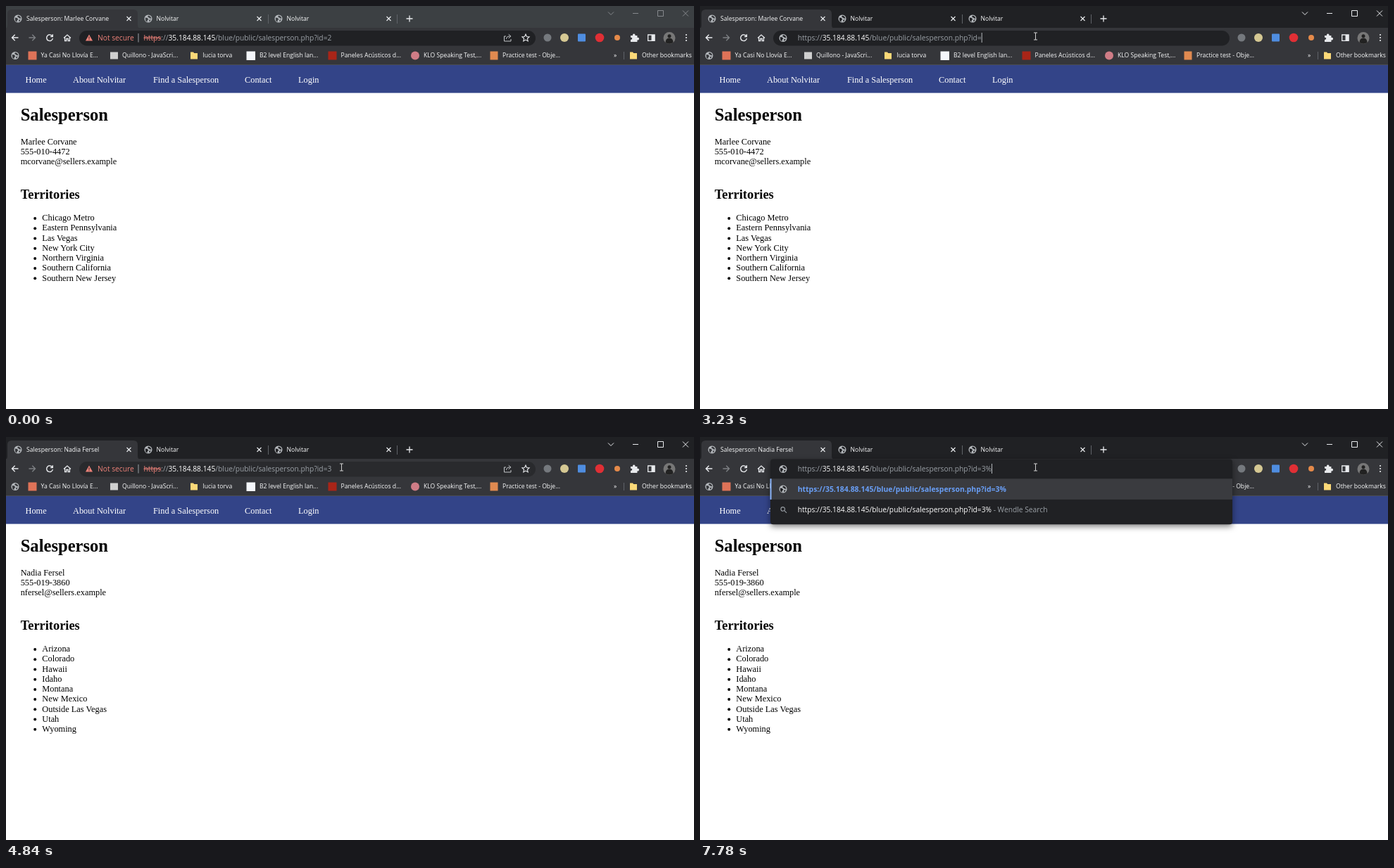
Write an HTML page that moves like this. It is 977x573 px and loops after 8000 ms.

```html
<!DOCTYPE html>
<html lang="en">
<head>
<meta charset="utf-8">
<title>Browser session</title>
<style>
  html, body { margin: 0; width: 100%; height: 100%; overflow: hidden; background: #fff; }
  svg { display: block; width: 977px; height: 573px; }
  .ui { font: 8.65px "Open Sans", sans-serif; fill: #f8f9fa; }
  .url { font: 10.26px "Open Sans", sans-serif; fill: #9aa0a6; }
  .match { font: bold 10.43px "Open Sans", sans-serif; fill: #699ef5; }
  .page { font: 12.35px "Liberation Serif", serif; }
  .h1 { font: bold 24.6px "Liberation Serif", serif; }
  .h2 { font: bold 18.4px "Liberation Serif", serif; }
  .white { fill: #fff; }
  .red { fill: #ee8279; }
  .strike { text-decoration: line-through; }
  .drop { filter: drop-shadow(0 3px 4px rgba(0, 0, 0, .5)); }
</style>
</head>
<body>
<svg id="stage" viewBox="0 0 977 573"></svg>
<script>
const LOOP = 8000;
const DARK = '#202124', BAR = '#35363a', LIGHT = '#e8eaed', GREY = '#9aa0a6', BLUE = '#8ab4f8';
const HOST = '35.184.88.145', PATH = '/blue/public/salesperson.php?id=';
const BRAND = 'Nolvitar';
const people = [
  { id: 2, name: 'Marlee Corvane', phone: '555-010-4472', mail: 'mcorvane@sellers.example',
    areas: ['Chicago Metro', 'Eastern Pennsylvania', 'Las Vegas', 'New York City',
      'Northern Virginia', 'Southern California', 'Southern New Jersey'] },
  { id: 3, name: 'Nadia Fersel', phone: '555-019-3860', mail: 'nfersel@sellers.example',
    areas: ['Arizona', 'Colorado', 'Hawaii', 'Idaho', 'Montana', 'New Mexico',
      'Outside Las Vegas', 'Utah', 'Wyoming'] },
];

const stage = document.getElementById('stage');
const ruler = document.createElement('canvas').getContext('2d');
const widthOf = s => {
  ruler.font = '10.26px "Open Sans", sans-serif';
  return ruler.measureText(s).width;
};
const during = (t, ...spans) => spans.some(([from, to]) => t >= from && t < to);

const text = (x, y, s, cls = 'ui') => `<text x="${x}" y="${y}" class="${cls}">${s}</text>`;
const rect = (x, y, w, h, fill, r = 0, more = '') =>
  `<rect x="${x}" y="${y}" width="${w}" height="${h}" rx="${r}" fill="${fill}" ${more}/>`;
const disc = (x, y, r, fill) => `<circle cx="${x}" cy="${y}" r="${r}" fill="${fill}"/>`;
const line = (d, color = LIGHT, w = 1.2) =>
  `<path d="${d}" fill="none" stroke="${color}" stroke-width="${w}"/>`;
const shape = (d, fill) => `<path d="${d}" fill="${fill}"/>`;
const cross = (x, y, r, color, w) =>
  line(`M${x - r} ${y - r}l${2 * r} ${2 * r}m0 ${-2 * r}l${-2 * r} ${2 * r}`, color, w);

const globe = (x, y, back = BAR) => disc(x, y, 5.5, '#b4b8bc') +
  shape(`M${x - 4.2} ${y - 1.5}l3 .6 1.6 1.8-1.6 1.4-.4 2.4-2.2-1.8z
    M${x} ${y - 4.4}l3 1.2 1.5 2.6-2 .4-1.4-1.4-1.9-.6z M${x + 1.6} ${y + 1.4}l2.2-.2-1.6 2.8-1.2-.6z`, back);
const folder = (x, y) => shape(`M${x - 5} ${y - 5}h4l1.2 1.5h4.8v8.5h-10z`, '#fbd978');

function tabStrip(active, title, loading, t) {
  const controls = active ? LIGHT : '#85888c';
  const strip = active ? DARK : '#3c4043';
  const angle = t * .5 % 360;
  const spinner = `<g transform="rotate(${angle} 17 18)">${line('M17 13a5 5 0 1 1-5 5', BLUE, 1.6)}</g>`;
  return rect(0, 0, 977, 32, strip) +
    shape('M0 32q2-1 2-5V11q0-6 6-6h173q6 0 6 6v16q0 4 3 5z', BAR) +
    (loading ? spinner : globe(17, 18)) + text(29, 21.3, title) +
    [202, 387].map(x => globe(x, 18, strip) + text(x + 11.5, 21.3, BRAND)).join('') +
    [174.5, 359.5, 543.5].map(x => cross(x, 18, 3, LIGHT, 1.2)).join('') +
    line('M372.5 12v13M555.5 12v13', '#5f6368', 1) +
    line('M568.5 18h9M573 13.5v9', LIGHT, 1.3) +
    line('M855 8.5l4 4 4-4M890 10.5h8', controls, 1) +
    line('M925.5 6.5h8v8h-8z', controls, 1) + cross(965, 10.5, 4, controls, 1);
}

function toolbar(loading) {
  const reload = loading ? cross(62, 45, 4, LIGHT, 1.4)
    : line('M65.6 42.6A4.4 4.4 0 1 0 66.4 46M66.3 40.3v3.2h-3.2', LIGHT, 1.4);
  return rect(0, 31, 977, 53, BAR) + rect(0, 83, 977, 1, '#494c50') +
    line('M17.5 45H8.5M12.7 40.8L8.5 45l4.2 4.2', LIGHT, 1.4) +
    line('M32.5 45h9M37.3 40.8l4.2 4.2-4.2 4.2', '#7d8084', 1.4) + reload +
    line('M82 45.5l5-4.5 5 4.5M83.6 44.5v5h2.2v-3h2.4v3h2.2v-5', LIGHT, 1.3) +
    disc(769, 45, 5.5, '#75797e') + disc(793, 45, 6, '#d5c893') +
    rect(812, 39.5, 11, 11, '#4f8de0', 1) + disc(843, 45, 6.3, '#e02f35') + disc(868, 45, 4, '#e58a4a') +
    shape('M887 42h3a1.8 1.8 0 1 1 3.4 0h3v3a1.8 1.8 0 1 1 0 3.2v2.8h-9.4v-3.2a1.6 1.6 0 1 0 0-3z', LIGHT) +
    line('M911.7 41h9.4v8.4h-9.4z', LIGHT, 1.3) + rect(916.5, 41, 4.6, 8.4, LIGHT) +
    disc(942, 45.5, 8.5, '#777') + disc(942, 42.8, 2.5, '#222') +
    shape('M936.5 52q0-6.5 5.5-6.5t5.5 6.5q-5.5 3.5-11 0z', '#222') +
    [41, 45, 49].map(y => disc(966, y, 1.1, LIGHT)).join('');
}

const bookmarks = globe(13, 70.5) +
  rect(31.5, 64.5, 12, 12, '#df7358') + text(49.5, 73.3, 'Ya Casi No Llovía E...') +
  rect(148, 65.5, 11, 10, '#cfcfcf') + text(165, 73.3, 'Quillono - JavaScri...') +
  folder(267, 70.5) + text(279.5, 73.3, 'lucia torva') +
  rect(341.5, 64.5, 12.5, 12.5, '#f4f6fb') + text(360, 73.3, 'B2 level English lan...') +
  rect(457.5, 64.5, 12, 12, '#a92518') + text(475.5, 73.3, 'Paneles Acústicos d...') +
  disc(581, 70.5, 6, '#cf7c86') + text(593, 73.3, 'KLO Speaking Test,...') +
  rect(687.5, 64.5, 11, 12, '#e08a50') + text(705, 73.3, 'Practice test - Obje...') +
  text(863, 73.3, '»') + line('M877.5 65v11', '#5f6368', 1) +
  folder(891, 70.5) + text(903, 73.3, 'Other bookmarks');

const address = (x, id, scheme) => text(x, 49, `${scheme}<tspan class="white">${HOST}</tspan>${PATH}${id}`, 'url');
const caretAt = x => rect(x, 38, 1, 14, '#b4b8bc');

function pageAddress(id, focused, hover, selected, caret) {
  const full = `https://${HOST}${PATH}${id}`, x = 195.5, w = widthOf(full);
  const ring = focused ? `stroke="${BLUE}" stroke-width="2"` : '';
  return rect(104, 35, 648, 21.5, hover ? '#292a2d' : DARK, 10.75, ring) +
    shape('M118 40.5l5 9h-10z', '#ee8279') + rect(117.5, 43.5, 1, 3, DARK) + rect(117.5, 47.3, 1, 1, DARK) +
    text(130, 49, 'Not secure', 'url red') + rect(187.5, 39, 1, 12.5, GREY) +
    (selected
      ? rect(x, 38, w, 15, '#4f6f9f') + text(x, 49, full.replace('https', '<tspan class="strike">https</tspan>'), 'url white')
      : address(x, id, '<tspan class="red strike">https</tspan>://')) +
    (caret ? caretAt(x + w) : '') +
    line('M710 43h-2.5v7h9.5v-3M710.5 47q0-4 5-4M713.7 40.3l3.3 2.7-3.3 2.7', '#c4c7ca', 1) +
    line('M738 40.2l1.5 3.3 3.6.4-2.7 2.4.8 3.6-3.2-1.8-3.2 1.8.8-3.6-2.7-2.4 3.6-.4z', LIGHT, 1.1);
}

function suggestions(id, rows) {
  const url = `https://${HOST}${PATH}`, step = 29.6;
  let out = `<g class="drop">${rect(100, 31.5, 656, 33.5 + rows * step, DARK, 4)}</g>` +
    rect(100, 59.3, 656, step, '#3a3b3f') + rect(99.5, 59.3, 2, step, BLUE);
  for (let i = 0; i < rows; i++) {
    const y = 77.8 + i * step;
    if (i === 1) {
      out += line(`M120 ${y - 2.5}l3 3M120.5 ${y - 5}a2.8 2.8 0 1 1-5.6 0 2.8 2.8 0 1 1 5.6 0`, GREY, 1.1) +
        text(138.7, y, `<tspan class="white">${url}${id}</tspan> - Wendle Search`, 'url');
    } else {
      out += globe(118, y - 3.8, DARK) + text(138.7, y, url + (i ? [2, 1, 3, 10][i - 2] : id), 'match');
    }
  }
  return out;
}

function typedAddress(id, rows, caret) {
  const x = 138.7;
  return (rows ? suggestions(id, rows) : rect(104, 35, 648, 21.5, DARK, 10.75)) +
    globe(118, 45.5, DARK) + address(x, id, 'https://') +
    (caret ? caretAt(x + widthOf(`https://${HOST}${PATH}${id}`)) : '');
}

function page(p) {
  const nav = [[27.5, 'Home'], [95, `About ${BRAND}`], [209, 'Find a Salesperson'], [339, 'Contact'], [415, 'Login']];
  return rect(0, 84, 977, 489, '#fff') + rect(0, 84, 977, 39.6, '#334488') +
    nav.map(([x, s]) => text(x, 109, s, 'page white')).join('') +
    text(20.7, 162.7, 'Salesperson', 'h1') +
    [p.name, p.phone, p.mail].map((s, i) => text(20.7, 196.6 + i * 14.2, s, 'page')).join('') +
    text(20.7, 274.3, 'Territories', 'h2') +
    p.areas.map((s, i) => disc(41.2, 302 + i * 14.22, 2, '#000') + text(51.3, 305.2 + i * 14.22, s, 'page')).join('');
}

function pointer(t) {
  const arrow = (x, y) => `<path d="M${x} ${y}v12l2.8-2.6 1.8 4.2 1.8-.8-1.8-4h3.8z" fill="#fff" stroke="#000" stroke-width=".7"/>`;
  if (t < 590) return during(t, [190, 330]) ? arrow(t < 260 ? 918 : 900, 566) : '';
  const rest = 1 - Math.min(1, (t - 590) / 750);
  const x = t < 2150 ? 469.5 + 150 * rest ** 2 : 476.5;
  const y = t < 2150 ? 42 + 368 * rest ** 2 : 43;
  if (y > 57) return arrow(x, y);
  const click = during(t, [1410, 1630], [2350, 2480], [5300, 5450], [6370, 6500]);
  return line(`M${x - 2.5} ${y - 5}h5M${x} ${y - 5}v10M${x - 2.5} ${y + 5}h5`, '#d0d0d0', 1) +
    (click ? disc(x - 1.5, y - 1, 9.5, 'rgba(240,215,0,.65)') : '');
}

function scene(t) {
  const person = people[t < 4400 ? 0 : 1];
  const loading = during(t, [3900, 4840]);
  const typing = during(t, [3230, 4400], [7710, LOOP]);
  const typed = t < 3510 ? '' : t < 7710 ? '3' : '3%';
  const rows = during(t, [3300, 3510]) ? 6 : during(t, [3510, 3900], [7780, LOOP]) ? 2 : 0;
  const focused = during(t, [1630, 3230], [5300, 7710]);
  const selected = during(t, [1630, 2350], [5300, 6370]);
  const hover = during(t, [1200, 1630], [4400, 5300]);
  const caret = during(t, [2350, 2880], [6370, 6920], [7450, 7710]);
  return tabStrip(t >= 1630, `Salesperson: ${person.name}`, loading, t) + toolbar(loading) +
    bookmarks + page(person) +
    (typing ? typedAddress(typed, rows, !loading) : pageAddress(person.id, focused, hover, selected, caret)) +
    pointer(t);
}

let shown = '';
function frame() {
  const next = scene(performance.now() % LOOP);
  if (next !== shown) stage.innerHTML = shown = next;
  requestAnimationFrame(frame);
}
frame();
</script>
</body>
</html>
```
